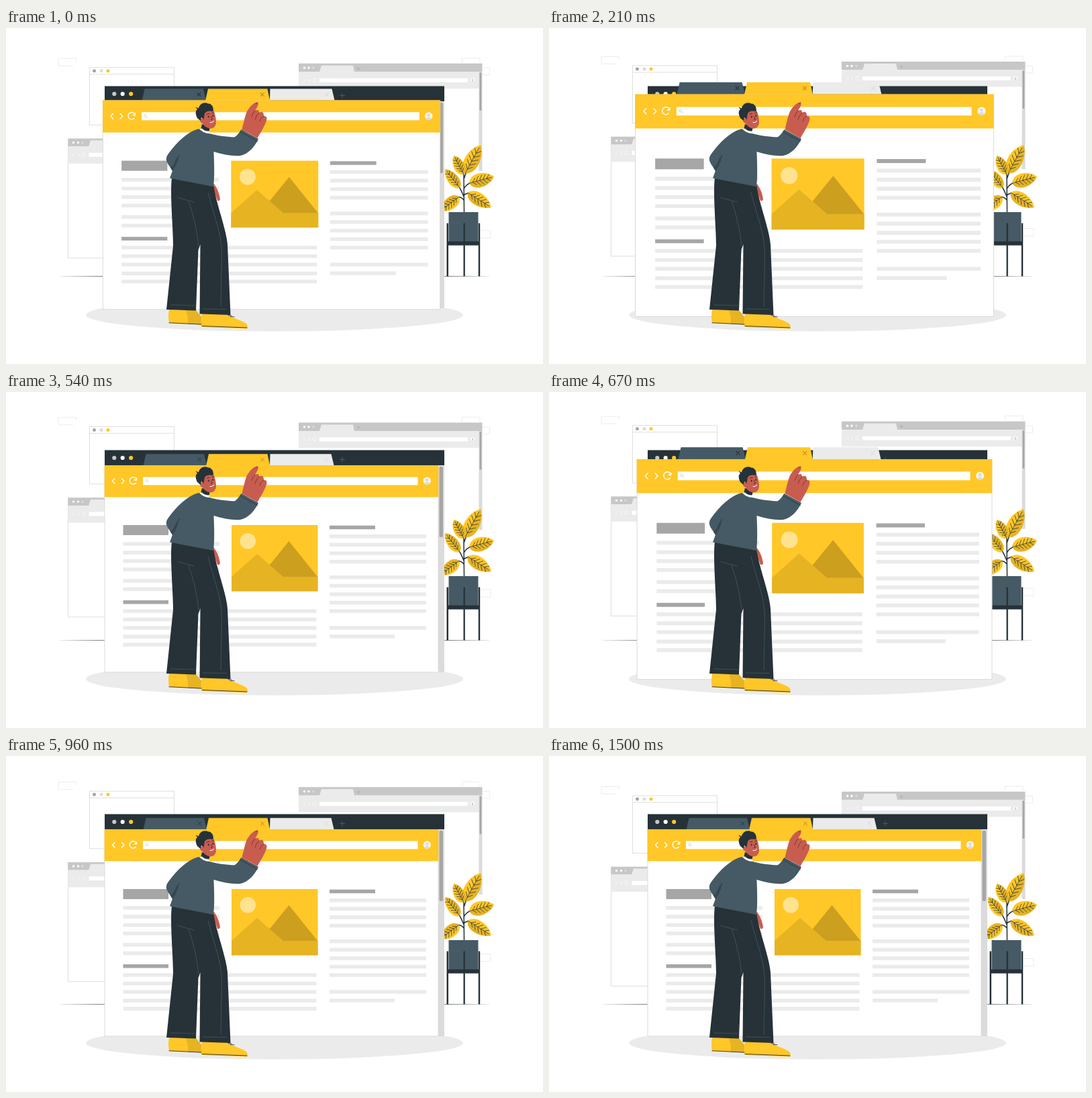
Animation, 800 px wide and 500 px high, one loop 1540 ms. Source, as an HTML page:

```html
<!DOCTYPE html>
<html lang="en">
<head>
<meta charset="utf-8">
<title>Browser tabs</title>
<style>
  html, body { margin: 0; width: 100%; height: 100%; overflow: hidden; background: #fff; }
  svg { display: block; width: 800px; height: 500px; }
  .y { fill: #ffc727 } .y2 { fill: #e6b323 } .y3 { fill: #cc9f1f }
  .d { fill: #263238 } .s { fill: #455a64 } .skin { fill: #c85d4f }
  .g1 { fill: #ebebeb } .g2 { fill: #dbdbdb } .g3 { fill: #c7c7c7 } .g4 { fill: #a6a6a6 } .w { fill: #fff }
  .line { fill: none; stroke-linecap: round; stroke-linejoin: round }
  .box { fill: none; stroke: #ececec }
  .ink { stroke: #263238 } .slate { stroke: #455a64 } .white { stroke: #fff }
</style>
</head>
<body>
<svg viewBox="0 0 800 500">
  <defs>
    <linearGradient id="fade" gradientUnits="userSpaceOnUse" x1="80" x2="720">
      <stop offset="0" stop-color="#263238" stop-opacity=".1"/>
      <stop offset=".09" stop-color="#263238" stop-opacity=".6"/>
      <stop offset=".91" stop-color="#263238" stop-opacity=".6"/>
      <stop offset="1" stop-color="#263238" stop-opacity=".1"/>
    </linearGradient>
  </defs>

  <g id="back">
    <g class="box">
      <path d="M78 45.500H104.500V50M78 45.500V56.500H100M679.500 52V45H706V52M709 59.500H720.500V70H709M707 301.500H722V312.500H707"/>
    </g>
    <rect x="124.500" y="59" width="126" height="85.500" fill="#fff" stroke="#dedede"/>
    <path d="M124.500 69H250.500" stroke="#dedede"/>
    <circle cx="131.500" cy="64" r="2.500" class="g4"/><circle cx="142" cy="64" r="2.500" class="g2"/><circle cx="152" cy="64" r="2.500" class="y"/>

    <path class="w" d="M436 53H709.500V213H436z"/>
    <path class="g3" d="M436 53H709.500V65.500H436z"/>
    <path class="g1" d="M436 65.500H709.500V90.500H436zM467 65.500L470 56H517L519 65.500z"/>
    <path class="w" d="M467 75H688V81H467z"/>
    <path class="g2" d="M704.500 65.500H709.500V213H704.500z"/>
    <path class="g4" d="M705.500 66.500H708.300V123H705.500z"/>
    <circle cx="444.500" cy="59.500" r="1.700" class="w"/><circle cx="451" cy="59.500" r="1.700" class="w"/><circle cx="458" cy="59.500" r="1.700" class="g2"/>
    <path class="line white" stroke-width=".7" d="M446 76L444 78L446 80M451 76L453 78L451 80M462 76A2.700 2.700 0 1 0 462.500 78.500"/>
    <path class="line" stroke="#a6a6a6" stroke-width=".7" d="M523 60.500H527M525 58.500V62.500"/>
    <circle cx="695" cy="78" r="3" class="w"/><circle cx="695" cy="77.500" r="1.200" class="g3"/><path class="g3" d="M693 80.200Q695 77.500 697 80.200z"/>

    <rect x="92.500" y="165" width="90" height="177.500" fill="#fff" stroke="#dedede"/>
    <path class="g3" d="M92.500 165H180V176.500H92.500z"/>
    <path class="g1" d="M92.500 176.500H180V202H92.500zM123 176.500L126 167.500H170V176.500z"/>
    <path class="w" d="M123.500 186H180V192H123.500z"/>
    <circle cx="100.500" cy="170.700" r="1.700" class="w"/><circle cx="107.500" cy="170.700" r="1.700" class="w"/><circle cx="114" cy="170.700" r="1.700" class="g2"/>
    <path class="line white" stroke-width=".7" d="M101 187L99 189L101 191M107 187L109 189L107 191M118 187A2.700 2.700 0 1 0 118.500 189.500"/>
  </g>

  <path d="M80 369H720V370H80z" fill="url(#fade)"/>
  <ellipse cx="400" cy="427" rx="281" ry="24.500" class="g1"/>

  <g id="plant">
    <path class="line ink" stroke-width="1.500" d="M682.500 275L682 218M682 240Q684 234 691 231M682 251Q679 243 676 238M682 249Q685 246 689 246M682 256Q678 251 673 252M682 225Q684 219 686 214"/>
    <path class="s" d="M659.500 274H703.500V318H659.500z"/>
    <path class="d" d="M657 317.500H706V323.500H657zM656.500 290.500H659V369.500H656.500zM681.500 290.500H683.800V369.500H681.500zM703.800 290.500H706.200V369.500H703.800z"/>
  </g>

  <path class="d" d="M147 86.500H653V109H147z"/>
  <circle cx="161.300" cy="98" r="3.100" class="g3"/><circle cx="173.700" cy="98" r="3.100" class="w"/><circle cx="186.200" cy="98" r="3.100" class="y"/>
  <path class="line slate" d="M497.500 100.500H504.500M501 97V104"/>
  <path class="g2" d="M644 109H653V417H644z"/>
  <rect x="645.500" y="111" width="5.500" height="105" rx="2" class="g4"/>

  <g id="page">
    <path class="s" d="M204.700 109L208.500 92.300H295L299 109z"/>
    <path class="g1" d="M393 109L393.500 92.300H484.500L488.500 109z"/>
    <path class="y" d="M298 110L302 92.300H389.500L393.300 110z"/>
    <g class="line" stroke-width="1">
      <path class="ink" d="M286 98L291 103M291 98L286 103"/>
      <path stroke="#b88f1c" d="M379.500 98L384.500 103M384.500 98L379.500 103"/>
      <path stroke="#dbdbdb" d="M474.500 98L479.500 103M479.500 98L474.500 103"/>
    </g>
    <rect x="147" y="109.500" width="497" height="307.500" fill="#fff" stroke="#dbdbdb"/>
    <path class="y" d="M146.700 109H644.300V156.500H146.700z"/>
    <path class="line white" stroke-width="1.400" d="M162 128.700L158.500 132.500L162 136.300M172.500 128.700L176 132.500L172.500 136.300M194 129.500A5.200 5.200 0 1 0 193.300 135.500M194.800 128.300L194.300 131.300L191.400 130.800"/>
    <path class="w" d="M204 126.500H613.500V138.500H204z"/>
    <path class="line" stroke="#dbdbdb" d="M211 133.500L212.500 135M211.300 131.700A1.800 1.800 0 1 1 207.700 131.700A1.800 1.800 0 1 1 211.300 131.700"/>
    <circle cx="627.300" cy="132.300" r="5.700" fill="#f7f4ea"/>
    <circle cx="627.300" cy="130.800" r="2.200" class="g2"/><path class="g2" d="M623.500 136.300Q627.300 130.500 631.100 136.300Q627.300 139 623.500 136.300z"/>
    <path class="g4" d="M174.500 198H242V213H174.500zM174.500 310H242V315.500H174.500zM482 198.800H550V204.300H482z"/>
    <path id="copy" class="g1"/>
    <path class="y" d="M336 198H464.500V296.500H336z"/>
    <circle cx="360.300" cy="221.800" r="11.800" fill="#ffe391"/>
    <path class="y3" d="M421.500 222L464.500 275.500H378z"/>
    <path class="y2" d="M336 275L374 241L413 275H464.500V296.500H336z"/>
  </g>

  <g id="man">
    <path class="skin" d="M308 230C314 236 318 246 319 255Q318 258 315 257C313 250 309 243 307 238z"/>
    <path class="y" d="M243 419L283 420L292 431V441.500L243 439Q241 430 243 419z"/>
    <path class="y2" d="M268 420L283 420L292 431V441.500L271 440.500Q272 430 268 420z"/>
    <path class="y" d="M292 426H330C339 433 352 435 358 440Q361 444 359 447.500L292 445Q289 436 292 426z"/>
    <path class="line ink" stroke-width=".9" d="M243 438.700L291 441M292 443.500L359 446M331 427.500L336 428M334 429.500L340 429.800"/>
    <path class="d" d="M247 223L309.500 235C313 262 328 298 330 322L334.500 427L288.500 425.500L289.500 322L286.500 330L283 420.500L239 419L249 324C249 298 244 248 247 223z"/>
    <path class="line slate" stroke-width=".8" d="M256 252.500L280 259M272 258C280 280 284 300 287 324M301 245C309 277 321 305 321.500 335L320 414M246 412L281 413M293 418L328 418.500"/>
    <path class="d" d="M292 143L304 147L302 156L290 151z"/>
    <path class="s" d="M288 150C272 153 254 170 242 187Q236 194 241 202L248 212.500L244 223.500L309 236C311 219 310 200 309.500 184C322 188 338 191 349 190C361 188 371 176 376 165L350.500 151C347 156 344 161 340 162.500C328 162 313 160 303 157Q295 156 288 150z"/>
    <path class="w" d="M288 150L292 149.500Q296 154 303 153.500L303 157Q294 157 288 150z"/>
    <path class="line ink" stroke-width=".8" d="M248 212Q250 200 258 189M349 154.500L374.500 168.500"/>
    <path fill="#37474f" d="M248 212.500L245 208Q253 201 258 189Q256 203 248 212.500z"/>
    <path class="skin" d="M351.500 151C354 141 356 131 359 124C364 116 369 111 374 110.500C378 112 374 118 371 123Q377 120 377 126Q384 122 384 131Q390 130 388 138C385 147 379 156 374.500 164z"/>
    <path class="line" stroke="#6b2f2c" stroke-width=".8" d="M371 123Q367 127 366 132M377 126Q372 131 371 136M384 131Q379 134 378 139M372 113L375 111"/>
    <path class="skin" d="M293 125L308 121C312 127 313 135 313 142Q311 150 304 149.500Q297 149 293 142Q289 141 289 137Q290 133 293 135z"/>
    <path class="d" d="M285 134C283 130 281 124 285 121L282.500 117.500L287 119.500C288 113 296 109 301 112.500C306 112 310 118 308.500 124Q299 122 296 127L294.500 136L291 133L289.500 138z"/>
    <ellipse cx="301.700" cy="132" rx="1" ry="1.500" class="d"/><ellipse cx="308.300" cy="130.500" rx="1" ry="1.500" class="d"/>
    <path class="line ink" stroke-width=".9" d="M299 128.500Q301 126.500 303 127.500M307 126.500L309.500 126M305.500 132L307.500 136L305.500 136.500"/>
    <path class="line white" stroke-width="1.100" d="M304 140.500Q307 141.500 309.500 138.500"/>
  </g>
</svg>
<script>
const $ = id => document.getElementById(id);

// Paragraph bars: [left, right, centre heights]
const paragraphs = [
  [174.5, 318, [226, 239, 251.5, 264, 281, 293.5]],
  [174.5, 462.5, [326, 338.5, 351, 364, 376]],
  [482, 626, [214.7, 227.3, 240, 252.5, 275.7, 288.3, 301, 313.5, 326, 351]],
  [482, 579, [363.7]]
];
$('copy').setAttribute('d', paragraphs.map(([l, r, ys]) =>
  ys.map(y => `M${l} ${y - 2.7}H${r}v5.4H${l}z`).join('')).join(''));

// A two-tone leaf with veins, from base to tip
function leaf(x, y, tipX, tipY, w) {
  const n = Math.hypot(tipX - x, tipY - y);
  const angle = Math.atan2(tipY - y, tipX - x) * 180 / Math.PI;
  const half = side => `M0 0C${n * .1} ${side * w} ${n * .7} ${side * w} ${n} 0z`;
  let veins = `M0 0H${n * .9}`;
  for (let i = 1; i < 6; i++) {
    const a = n * i * .14, b = a + n * .13, h = w * .5 * Math.sin(Math.PI * (i + 1) / 8);
    veins += `M${b} ${-h}L${a} 0L${b} ${h}`;
  }
  return `<g transform="translate(${x} ${y}) rotate(${angle})"><path class="y" d="${half(-1)}"/>
    <path class="y2" d="${half(1)}"/><path class="line ink" stroke-width=".7" d="${veins}"/></g>`;
}
$('plant').insertAdjacentHTML('beforeend', [
  [684, 216, 707, 174, 15], [682, 218, 667, 190, 11], [690, 231, 727, 221, 14],
  [676, 238, 654, 210, 11], [688, 245, 723, 267, 13], [675, 251, 648, 272, 12]
].map(a => leaf(...a)).join(''));

// Linear interpolation through [time, value] keys
function track(keys, t) {
  const i = Math.max(1, keys.findIndex(k => k[0] >= t));
  const [[t0, a], [t1, b]] = [keys[i - 1], keys[i]];
  return a + (b - a) * (t - t0) / (t1 - t0);
}
const beat = [[0, 1], [150, 1.1], [450, 1], [600, 1], [750, 1.1], [900, 1], [1500, 1]];
const float = [[0, 0], [750, -10], [1500, 0]];

function draw(now) {
  const step = Math.floor((now % 1540 + 5) / (1000 / 24));   // 24 pictures a second
  const t = Math.min(1500, 16 + step * 42.5);
  $('back').setAttribute('transform', `translate(0 ${track(float, t)})`);
  $('page').setAttribute('transform',
    `translate(395.5 250) scale(${track(beat, t)}) translate(-395.5 -250)`);
}
const start = performance.now();
(function tick() {
  draw(performance.now() - start);
  requestAnimationFrame(tick);
})();
</script>
</body>
</html>
```
